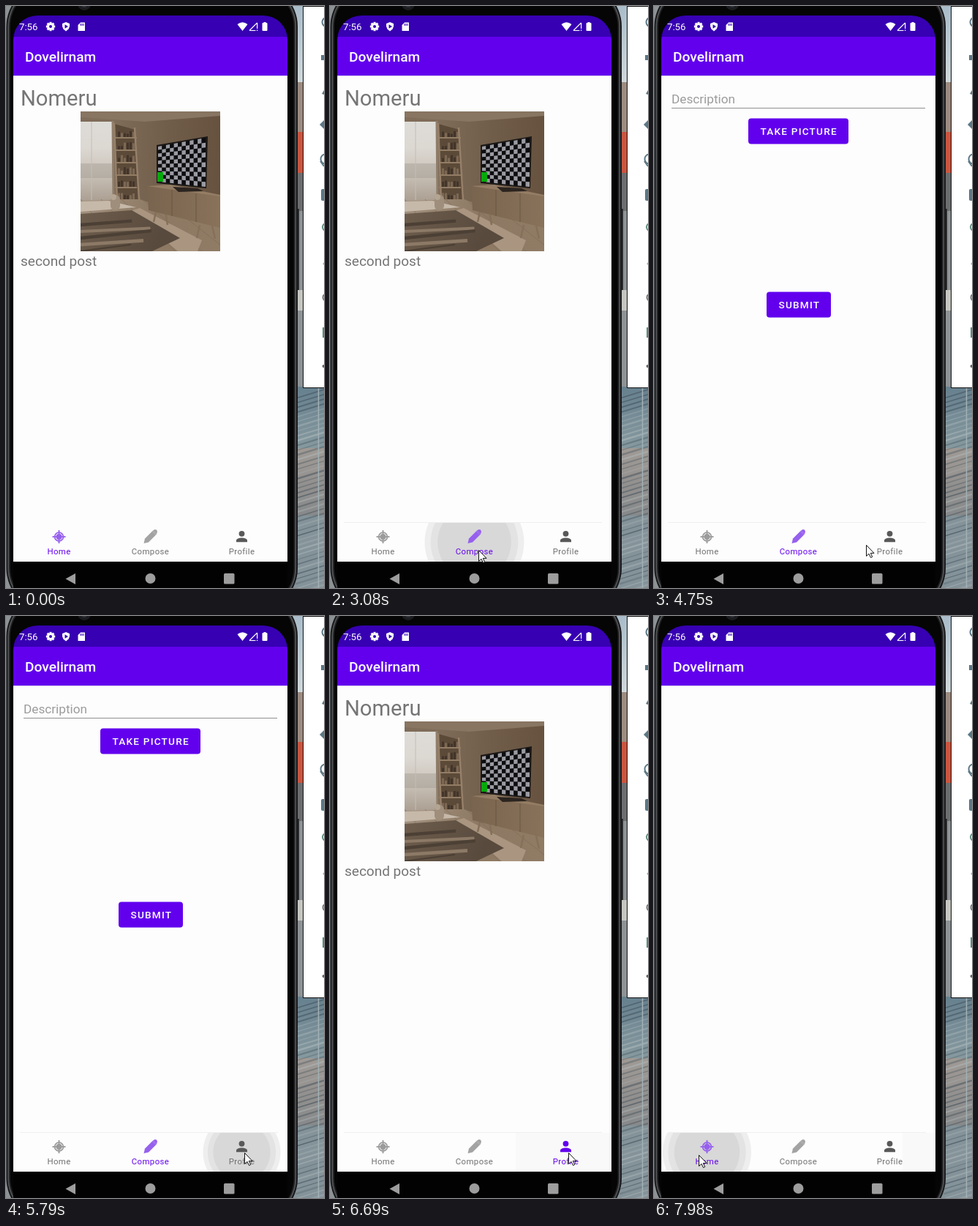
Animation, 435 px wide and 795 px high, one loop 8 s. Source, as an HTML page with a canvas:

```html
<!DOCTYPE html>
<html lang="en">
<head>
<meta charset="utf-8">
<title>Photo feed app</title>
<style>
html, body { margin: 0; width: 100%; height: 100%; overflow: hidden; background: #000; }
canvas { display: block; width: 435px; height: 795px; }
</style>
</head>
<body>
<canvas id="stage"></canvas>
<script>
const W = 435, H = 795, LOOP = 8000, STEP = 126;
const PURPLE = '#6200ee', DEEP = '#3700b3', SOFT = '#9660ee', GREY = '#757575', PAGE = '#fdfdfd';
const FONT = 'Roboto, "Open Sans", sans-serif';
const dpr = window.devicePixelRatio || 1;

function makeLayer(canvas) {
  canvas.width = W * dpr;
  canvas.height = H * dpr;
  const ctx = canvas.getContext('2d');
  ctx.scale(dpr, dpr);
  return ctx;
}

const stage = makeLayer(document.getElementById('stage'));
const deviceLayer = document.createElement('canvas');
const photoLayer = document.createElement('canvas');
let c = stage;

let seed = 7;
function random() {
  seed = (seed * 16807) % 2147483647;
  return seed / 2147483647;
}

function rect(x, y, w, h, fill) {
  c.fillStyle = fill;
  c.fillRect(x, y, w, h);
}
function poly(points, fill) {
  c.beginPath();
  points.forEach(([x, y]) => c.lineTo(x, y));
  c.closePath();
  c.fillStyle = fill;
  c.fill();
}
function line(x1, y1, x2, y2, color, width = 1) {
  c.beginPath();
  c.moveTo(x1, y1);
  c.lineTo(x2, y2);
  c.strokeStyle = color;
  c.lineWidth = width;
  c.stroke();
}
function disc(x, y, r, fill) {
  c.beginPath();
  c.arc(x, y, r, 0, 2 * Math.PI);
  c.fillStyle = fill;
  c.fill();
}
function ring(x, y, r, color, width) {
  c.beginPath();
  c.arc(x, y, r, 0, 2 * Math.PI);
  c.strokeStyle = color;
  c.lineWidth = width;
  c.stroke();
}
function round(x, y, w, h, r, fill) {
  c.beginPath();
  c.roundRect(x, y, w, h, r);
  c.fillStyle = fill;
  c.fill();
}
function clipped(x, y, w, h, r, paint) {
  c.save();
  c.beginPath();
  c.roundRect(x, y, w, h, r);
  c.clip();
  paint();
  c.restore();
}
function text(str, x, y, size, color, { weight = 400, spacing = 0, align = 'left' } = {}) {
  c.font = `${weight} ${size}px ${FONT}`;
  c.letterSpacing = spacing + 'px';
  c.textAlign = align;
  c.fillStyle = color;
  c.fillText(str, x, y);
}
function gradient(x1, y1, x2, y2, ...colors) {
  const g = c.createLinearGradient(x1, y1, x2, y2);
  colors.forEach((color, i) => g.addColorStop(i / (colors.length - 1), color));
  return g;
}

// Street behind the phone and the side panel
function drawStreet() {
  rect(0, 0, W, H, '#8d9294');
  rect(380, 0, 55, 104, gradient(0, 0, 0, 104, '#a9bcc9', '#cfd7da'));
  rect(396, 104, 12, 70, '#9c8b80');
  rect(396, 172, 12, 56, '#c9553f');
  rect(396, 228, 12, 52, '#6b6d6e');
  rect(396, 388, 12, 28, '#c5c5c1');
  rect(380, 520, 55, 84, gradient(0, 520, 0, 604, '#66808e', '#86999f'));
  rect(380, 604, 55, 92, gradient(0, 604, 0, 696, '#a09a95', '#87898a'));
  rect(380, 696, 55, 99, '#849399');
  for (let i = 0; i < 42; i++) {
    const y = 528 + i * 6.5, shade = random() < .55 ? '60,76,86' : '176,186,188';
    line(396, y + 8, 435, y - 4, `rgba(${shade},${.25 + random() * .35})`, 1 + random() * 1.5);
  }
  line(427.5, 521, 427.5, 795, '#a2b1b5', 1.5);
}

function drawPanel() {
  const ink = '#5b7885';
  rect(406, 0, 29, 522, '#111');
  rect(407, 1, 28, 520, '#fff');
  ring(439, 22, 6.5, ink, 2);
  rect(431, 67, 4, 7, ink);
  poly([[432, 120], [435, 115], [435, 121]], ink);
  poly([[429, 162], [435, 156], [435, 168]], ink);
  ring(437, 209, 6.5, ink, 2);
  line(430, 212, 435, 219, ink, 2);
  round(431, 250, 8, 16, 2, ink);
  ring(438, 302, 5, '#5f8c7e', 2);
  disc(435, 352, 1.5, '#9fb0b6');
  ring(438, 398, 4.5, '#777', 2);
  rect(433, 439, 2, 14, '#5f8c7e');
  disc(434.5, 492, 2, '#666');
}

function drawPhone() {
  rect(398, 277, 3, 111, '#2a2b2d');
  ['#141517', '#515254', '#202123', '#050505'].forEach((fill, i) => {
    const inset = i * 1.8;
    round(.5 + inset, -30 + inset, 398.5 - inset * 2, 856 - inset * 2, 58 - inset, fill);
  });
  disc(107, -3, 9, '#1b1c1f');
  disc(107, -2, 4, '#303238');

  clipped(10, 13, 375, 747, [33, 33, 0, 0], () => {
    rect(10, 13, 375, 29, DEEP);
    rect(10, 42, 375, 53, PURPLE);
    rect(10, 95, 375, 1, '#e4dcf0');
  });

  const nav = '#9d9d9d';
  rect(10, 759, 375, 36, '#020202');
  poly([[81.5, 782.5], [95, 775], [95, 790]], nav);
  disc(197.5, 782, 7, nav);
  round(298, 775, 14.5, 14.5, 1.5, nav);
}

function drawStatus() {
  text('7:56', 18, 33, 13.2, '#fff');
  for (let i = 0; i < 4; i++) {
    const a = i * Math.PI / 4, x = Math.cos(a) * 6.2, y = Math.sin(a) * 6.2;
    line(61 - x, 28 - y, 61 + x, 28 + y, '#fff', 3);
  }
  disc(61, 28, 4.8, '#fff');
  disc(61, 28, 2, DEEP);
  poly([[82, 22], [87, 24], [87, 28], [85.5, 31.5], [82, 34.5], [78.5, 31.5], [77, 28], [77, 24]], '#fff');
  poly([[80.5, 25.2], [85, 28], [80.5, 30.8]], DEEP);
  poly([[102, 22.5], [108, 22.5], [108, 34], [98.5, 34], [98.5, 26]], '#fff');
  for (let x = 101.5; x < 107; x += 2) rect(x, 24, 1, 3, DEEP);
  c.beginPath();
  c.moveTo(323.5, 34);
  c.lineTo(316.5, 25);
  c.quadraticCurveTo(323.5, 19.5, 330.5, 25);
  c.fillStyle = '#fff';
  c.fill();
  line(341.5, 33.5, 333, 33.5, '#fff', 1.1);
  line(333, 33.5, 343.5, 23, '#fff', 1.1);
  rect(343, 23, 1.2, 8, '#fff');
  rect(343, 32.5, 1.2, 1.5, '#fff');
  rect(352.5, 22, 3, 2, '#fff');
  round(350.5, 23, 7, 11, 1, '#fff');
}

function drawShelf() {
  poly([[148, 161], [177, 169], [183, 264], [152, 267]], '#5c4a39');
  for (let i = 0; i < 6; i++) {
    const y = 178 + i * 17;
    for (let x = 153; x < 174; x += 4) {
      const h = 4 + random() * 6;
      rect(x, y + 1 - h, 3, h, random() < .5 ? '#7c6853' : '#42352a');
    }
    line(149, y + 2, 179, y + 2, '#927c64', 2);
  }
  line(148, 160, 152, 267, '#96806a', 2.5);
  line(176, 166, 182, 264, '#96806a', 2.5);
}

function drawScreen() {
  poly([[228, 247], [262, 249], [270, 253], [236, 254]], '#2b241f');
  poly([[206, 190], [276, 178], [274, 249], [206, 242]], '#1c1917');
  const cols = 12, rows = 10;
  const at = (i, j) => {
    const u = i / cols, top = 192 - 12 * u, bottom = 240 + 7 * u;
    return [208 + 65 * u, top + (bottom - top) * j / rows];
  };
  for (let i = 0; i < cols; i++) {
    for (let j = 0; j < rows; j++) {
      const fill = (i + j) % 2 ? '#0d0d10' : '#9a9ba2';
      poly([at(i, j), at(i + 1, j), at(i + 1, j + 1), at(i, j + 1)], fill);
    }
  }
  rect(207, 227, 8, 13, '#06a80c');
}

function drawPhoto() {
  // Walls, ceiling and window
  rect(102, 144, 191, 191, gradient(146, 0, 293, 0, '#7f6c59', '#705d4a', '#66523f'));
  poly([[102, 144], [293, 144], [293, 150], [190, 158], [102, 152]], '#887562');
  rect(102, 158, 44, 108, gradient(0, 158, 0, 266, '#dedcd8', '#dcd8d2', '#c9c1b7', '#ab9f92'));
  rect(102, 215, 44, 20, 'rgba(150,143,136,.35)');
  line(117, 158, 117, 265, '#c4bdb4');
  line(146, 157, 147, 266, '#8f7d6a', 3);
  drawShelf();

  // Floor, sunlight and rug
  poly([[102, 266], [183, 264], [293, 302], [293, 335], [102, 335]], gradient(102, 264, 293, 335, '#a39280', '#8d7963', '#907b65'));
  for (let i = 0; i < 7; i++) line(102 + i * 28, 264, 160 + i * 36, 335, '#7d6955', .6);
  poly([[102, 267], [140, 266], [178, 275], [102, 281]], '#c6b9a9');
  poly([[183, 276], [268, 320], [262, 335], [235, 335], [170, 280]], '#a99580');
  poly([[102, 284], [172, 279], [238, 317], [200, 335], [102, 335]], gradient(102, 280, 200, 335, '#6d5d4d', '#584a3d'));
  for (let i = 0; i < 5; i++) {
    const y = 292 + i * 9, end = 170 + random() * 30;
    line(102, y + 7, end, y - 3 + random() * 6, i % 2 ? '#8c7966' : '#4c4035', 2 + random() * 3);
  }

  // Vase
  round(143, 258, 13, 21, 6, '#9e8e7b');
  disc(147, 261, 4, '#b4a592');

  // Cabinet
  [[206, 277, -4], [265, 299, -4], [282, 300, 4], [218, 281, 3]].forEach(([x, y, lean]) => line(x, y, x + lean, y + 18, '#86705a', 2.5));
  poly([[193, 246], [225, 244], [293, 258], [293, 263]], '#947d64');
  poly([[193, 246], [293, 260], [293, 303], [195, 279]], gradient(193, 0, 293, 0, '#79644f', '#89725a'));
  line(227, 251, 227, 287, '#66523f', .8);
  line(260, 256, 260, 295, '#66523f', .8);
  drawScreen();
}

function drawFeed() {
  text('Nomeru', 20, 136, 29.2, GREY);
  c.drawImage(photoLayer, 0, 0, W, H);
  text('second post', 20, 355, 19, GREY);
}

function button(label, x, y, w) {
  round(x, y, w, 35, 4, PURPLE);
  text(label, x + 16.5, y + 22.5, 13.6, '#fff', { weight: 500, spacing: 1.22 });
}

function drawForm() {
  text('Description', 24, 133, 17.2, '#9c9c9c');
  line(24, 139.5, 371, 139.5, '#909090');
  button('TAKE PICTURE', 129, 153.5, 137);
  button('SUBMIT', 154, 390.5, 88);
}

function homeIcon(color) {
  line(72.5, 716, 72.5, 734, color, 1.8);
  line(63.5, 725, 81.5, 725, color, 1.8);
  ring(72.5, 725, 5.9, color, 1.7);
  disc(72.5, 725, 4, color);
}
function pencilIcon(color) {
  poly([[188.5, 734], [190, 727.5], [200, 717.5], [205, 722.5], [195, 732.5]], color);
  poly([[201, 716.5], [203.5, 715], [206, 715.5], [207, 718], [206, 721.5]], color);
  line(200.5, 717, 205.5, 722, color, 1.5);
}
function personIcon(color) {
  disc(322.5, 720.8, 3.9, color);
  c.beginPath();
  c.moveTo(315, 732.3);
  c.lineTo(315, 730);
  c.bezierCurveTo(315, 725.3, 330, 725.3, 330, 730);
  c.lineTo(330, 732.3);
  c.fillStyle = color;
  c.fill();
}

const TABS = [
  { label: 'Home', x: 72.5, icon: homeIcon, off: '#9b9b9b', on: SOFT },
  { label: 'Compose', x: 197.5, icon: pencilIcon, off: '#a3a3a3', on: SOFT },
  { label: 'Profile', x: 322.5, icon: personIcon, off: '#595959', on: PURPLE }
];

// A press selects its tab one step later; `leave` drops the old view, `ready` shows the new one
const PRESSES = [
  { tab: 0, at: -LOOP, fade: -LOOP, leave: -LOOP, ready: 0, view: drawFeed },
  { tab: 1, at: 2800, fade: 3980, leave: 3830, ready: 3830, view: drawForm },
  { tab: 2, at: 5790, fade: 6420, leave: 5930, ready: 6690, view: drawFeed },
  { tab: 0, at: 7730, fade: LOOP, leave: 7860, ready: LOOP, view: drawFeed }
];

// The pointer eases to `to` in equal time steps; `from` makes it reappear elsewhere
const MOVES = [
  { at: 750, steps: 2, from: [300, 580], to: [252, 561] },
  { at: 1240, steps: 2, to: [206, 549], hide: 1480 },
  { at: 1620, steps: 2, from: [410, 768], to: [262, 703] },
  { at: 1890, steps: 4, to: [203, 743] },
  { at: 4620, steps: 6, to: [326, 733] },
  { at: 6830, steps: 7, to: [61, 736] }
];
MOVES.forEach((move, i) => move.from ??= MOVES[i - 1].to);

const easeOut = u => 1 - (1 - u) ** 3;

function drawRipple({ tab, at, fade }, t) {
  if (t >= fade) return;
  const stepsDone = Math.min(2, Math.floor((t - at) / STEP));
  const r = 53 + 7.5 * stepsDone;
  [1, .88, .74].forEach((k, i) => {
    const g = 238 - 11 * i;
    disc(TABS[tab].x, 732.5, r * k, `rgb(${g},${g},${g})`);
  });
}

function drawTabs(t) {
  const press = PRESSES.findLast(p => p.at <= t);
  const active = PRESSES.findLast(p => p.at + STEP <= t).tab;
  if (t >= PRESSES[1].at) line(19, 705.5, 372, 705.5, '#efefef');
  clipped(10, 706, 375, 53, 0, () => {
    if (t >= PRESSES[2].fade) {
      const left = press.tab === 2 ? 254 : 340;
      rect(left, 706, 385 - left, 53, '#f9f9f9');
    }
    drawRipple(press, t);
  });
  TABS.forEach((tab, i) => {
    const on = i === active;
    tab.icon(on ? tab.on : tab.off);
    text(tab.label, tab.x, 749, 11.4, on ? PURPLE : '#6f6f6f', { spacing: .38, align: 'center' });
  });
}

function drawPointer(t) {
  const move = MOVES.findLast(m => m.at <= t);
  if (!move || t >= move.hide) return;
  const { at, steps, from, to } = move;
  const u = easeOut(Math.min(1, (1 + Math.floor((t - at) / STEP)) / steps));
  const [x, y] = from.map((a, i) => Math.round(a + (to[i] - a) * u));
  c.save();
  c.translate(x + .5, y + .5);
  poly([[0, 0], [0, 15], [3.5, 11.8], [6, 17], [8.2, 16], [5.8, 10.9], [10.5, 10.9]], '#fff');
  c.strokeStyle = '#111';
  c.lineWidth = 1;
  c.stroke();
  c.restore();
}

function draw(t) {
  c.drawImage(deviceLayer, 0, 0, W, H);
  rect(10, 96, 375, 663, PAGE);
  const page = PRESSES.findLast(p => p.leave <= t);
  if (t >= page.ready) page.view();
  drawTabs(t);
  drawPointer(t);
}

c = makeLayer(deviceLayer);
drawStreet();
drawPhone();
drawPanel();
drawStatus();
text('Dovelirnam', 26, 76, 19.2, '#fff', { weight: 500 });
c = makeLayer(photoLayer);
clipped(102, 144, 191, 191, 0, drawPhoto);
c = stage;

const start = performance.now();
function tick() {
  draw((performance.now() - start) % LOOP);
  requestAnimationFrame(tick);
}
tick();
</script>
</body>
</html>
```
